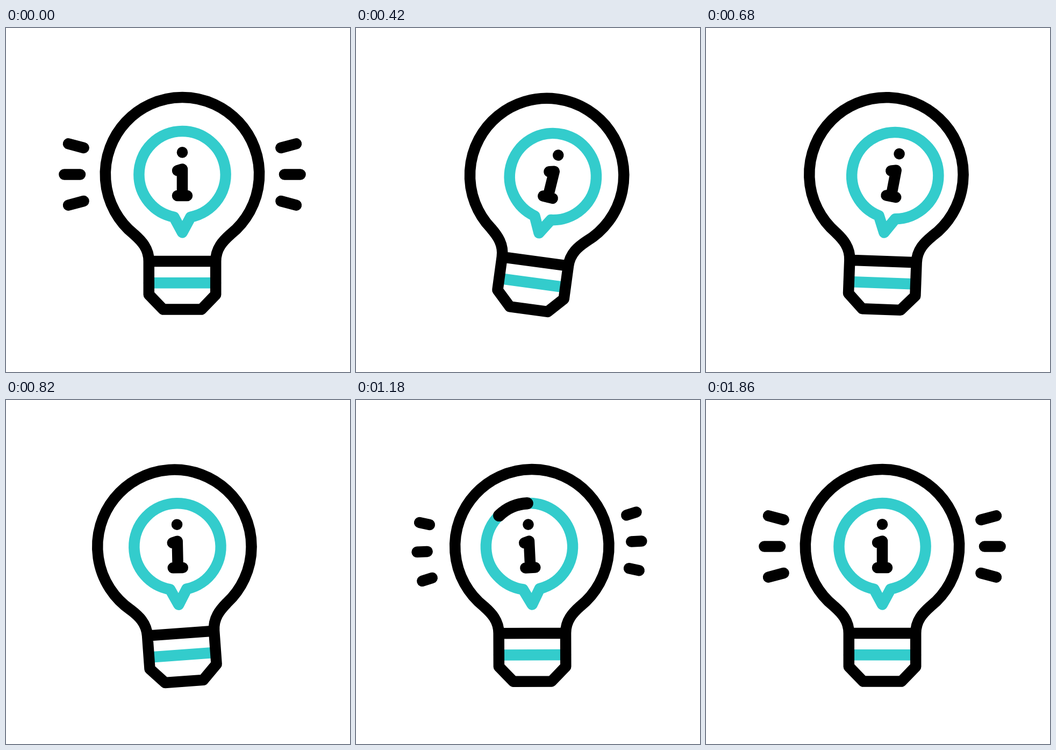
Write an HTML page with a canvas that moves like this. It is 640 by 640 pixels and loops after 1880 ms.

```html
<!DOCTYPE html>
<html lang="en">
<head>
<meta charset="utf-8">
<title>Idea bulb</title>
<style>
html, body { margin: 0; width: 100%; height: 100%; overflow: hidden; background: #fff; }
canvas { display: block; width: 640px; height: 640px; }
</style>
</head>
<body>
<canvas id="stage" width="640" height="640"></canvas>
<script>
const ctx = document.getElementById('stage').getContext('2d');
const LOOP = 1880, STEP = 20;
const BLACK = '#000', TEAL = '#33cccc', LINE = 20.5;
const CX = 328, CY = 272.6;
const PIVOT = 474, TIP = 380.5;

// Speech bubble: a circle opened at the bottom by a pointed tip
const GAP = 15.5, DROP = 79.1;
const RADIUS = Math.hypot(GAP, DROP);
const GAP_ANGLE = Math.atan2(GAP, DROP);
const BUBBLE_LENGTH = 2 * ((Math.PI - GAP_ANGLE) * RADIUS + Math.hypot(GAP, TIP - CY - DROP));

// Right-hand rays from inner to outer end, mirrored for the left
const RAYS = [
  [511.4, 223, 540, 215.4],
  [518, 272.6, 547.6, 272.6],
  [511.4, 322, 540, 329.6]
];

const BULB_KEYS = [[0, 0], [468, 7.95], [984, -7.95], [1200, 0]];
const BUBBLE_KEYS = [[0, 0], [665, 8.85], [1065, -8.85], [1244, 0]];

function ease(t, from, to) {
  const s = Math.min(1, Math.max(0, (t - from) / (to - from)));
  return s * s * (3 - 2 * s);
}

function swing(t, keys) {
  for (let i = 1; i < keys.length; i++) {
    const [t0, a] = keys[i - 1], [t1, b] = keys[i];
    if (t < t1) return a + (b - a) * ease(t, t0, t1);
  }
  return keys[keys.length - 1][1];
}

function rotateAbout(x, y, degrees) {
  ctx.translate(x, y);
  ctx.rotate(degrees * Math.PI / 180);
  ctx.translate(-x, -y);
}

function stroke(path, color, width = LINE) {
  ctx.strokeStyle = color;
  ctx.lineWidth = width;
  ctx.stroke(path);
}

const band = new Path2D('M266 474.2H390');
const bulb = new Path2D(
  'M265.8 434V496L292.5 523.6H363.5L390.2 496V434' +
  'C390.2 410 404 396 417.5 384' +
  'A143.2 143.2 0 1 0 238.5 384' +
  'C252 396 265.8 410 265.8 434H390.2');
const letter = new Path2D('M319 265.3L328 262.5V311.9M319 311.9H337');
const dot = new Path2D();
dot.arc(CX, 231.4, 10.3, 0, 2 * Math.PI);

const bubble = new Path2D();
bubble.arc(CX, CY, RADIUS, -Math.PI / 2, Math.PI / 2 + GAP_ANGLE, true);
bubble.lineTo(CX, TIP);
bubble.lineTo(CX + GAP, CY + DROP);
bubble.arc(CX, CY, RADIUS, Math.PI / 2 - GAP_ANGLE, -Math.PI / 2, true);

function drawTrace(t) {
  const head = ease(t, 1066, 1626) * BUBBLE_LENGTH;
  const tail = ease(t, 1236, 1856) * BUBBLE_LENGTH;
  if (head - tail < 0.1) return;
  ctx.setLineDash([head - tail, 2 * BUBBLE_LENGTH]);
  ctx.lineDashOffset = -tail;
  stroke(bubble, BLACK, 22.5);
  ctx.setLineDash([]);
}

function drawRays(t) {
  const growing = t > 600;
  const from = growing ? 0 : ease(t, 0, 260);
  const to = growing ? ease(t, 1003, 1298) : 1;
  if (to - from < 0.001) return;
  const path = new Path2D();
  for (const [x0, y0, x1, y1] of RAYS) {
    const dx = x1 - x0, dy = y1 - y0;
    for (const side of [-1, 1]) {
      path.moveTo(CX + side * (x0 + dx * from - CX), y0 + dy * from);
      path.lineTo(CX + side * (x0 + dx * to - CX), y0 + dy * to);
    }
  }
  stroke(path, BLACK);
}

function draw(t) {
  ctx.setTransform(1, 0, 0, 1, 0, 0);
  ctx.fillStyle = '#fff';
  ctx.fillRect(0, 0, 640, 640);
  ctx.lineCap = ctx.lineJoin = 'round';

  rotateAbout(CX, PIVOT, swing(t, BULB_KEYS));
  stroke(band, TEAL);
  stroke(bulb, BLACK);

  rotateAbout(CX, TIP, swing(t, BUBBLE_KEYS));
  stroke(bubble, TEAL);
  drawTrace(t);
  stroke(letter, BLACK);
  ctx.fillStyle = BLACK;
  ctx.fill(dot);
  drawRays(t);
}

function tick() {
  const t = performance.now() % LOOP;
  draw(Math.floor(t / STEP) * STEP);
  requestAnimationFrame(tick);
}
tick();
</script>
</body>
</html>
```
